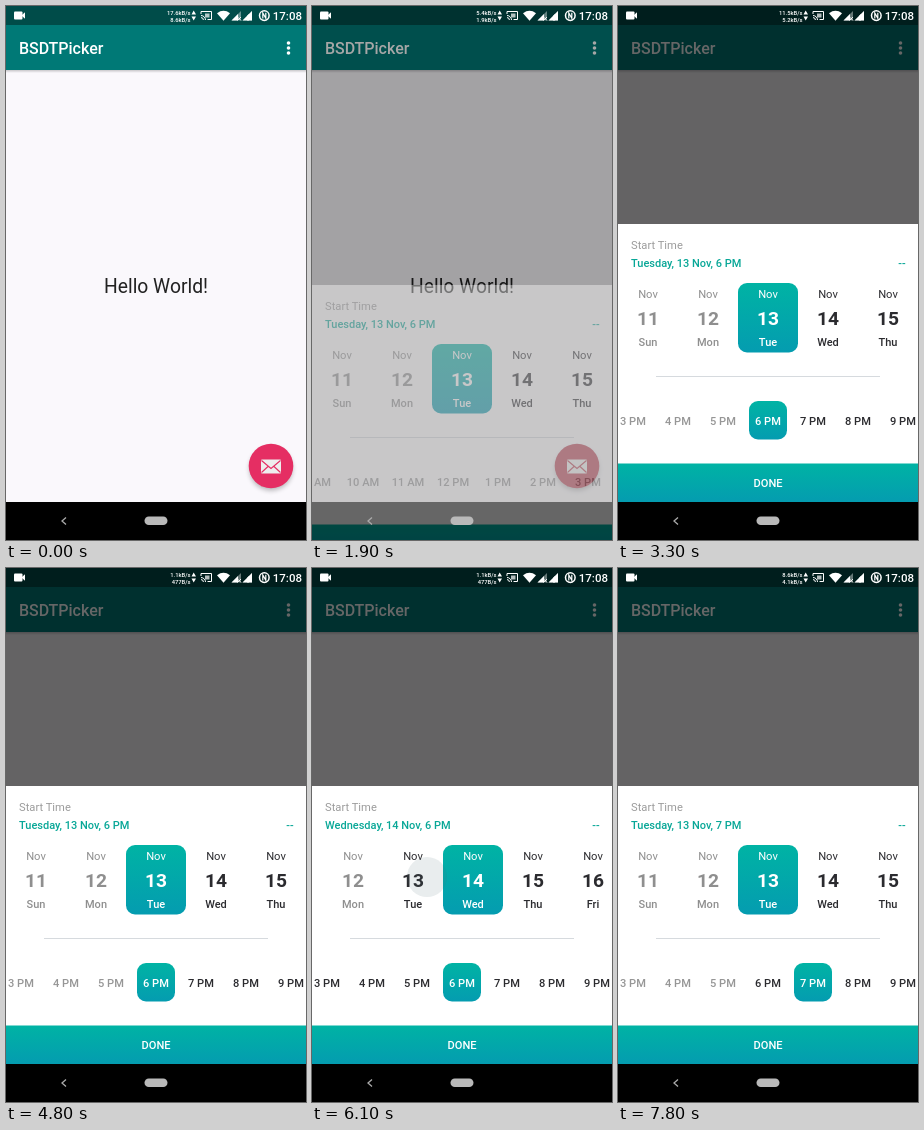
Animation of 300 by 534 pixels, one loop 8000 ms. Source, as an HTML page:

```html
<!DOCTYPE html>
<html lang="en">
<head>
<meta charset="utf-8">
<title>Date and time picker</title>
<style>
  html, body { margin: 0; width: 100%; height: 100%; overflow: hidden; background: #000; }
  svg { display: block; width: 100vw; height: 100vh; font-family: Roboto, "Noto Sans", sans-serif; }
</style>
</head>
<body>
<svg viewBox="0 0 300 534">
  <defs>
    <linearGradient id="teal" x1="0" y1="0" x2="0" y2="1">
      <stop offset="0" stop-color="#00b3a4"/>
      <stop offset="1" stop-color="#049cb0"/>
    </linearGradient>
    <linearGradient id="barShadow" x1="0" y1="0" x2="0" y2="1">
      <stop offset="0" stop-color="#000" stop-opacity=".2"/>
      <stop offset="1" stop-color="#000" stop-opacity="0"/>
    </linearGradient>
    <filter id="blur" x="-30%" y="-30%" width="160%" height="160%">
      <feGaussianBlur stdDeviation="2.5"/>
    </filter>
  </defs>
  <g id="scene"></g>
</svg>
<script>
const LOOP = 8000, STEP = 100;
const scene = document.getElementById('scene');
const WEEKDAYS = ['Sun', 'Mon', 'Tue', 'Wed', 'Thu', 'Fri', 'Sat'];
const LONG_DAYS = { 13: 'Tuesday', 14: 'Wednesday' };
const TODAY = 13, NOW_HOUR = 18;

// Each track holds its value until the next [time, value] entry.
const tracks = {
  net: [[0, ['17.6kB/s', '8.6kB/s']], [200, ['5.4kB/s', '1.9kB/s']], [3200, ['11.5kB/s', '5.2kB/s']],
        [4700, ['1.1kB/s', '477B/s']], [7800, ['8.6kB/s', '4.1kB/s']]],
  fab: [[0, '#e52e63'], [1500, '#dc2f5e'], [1600, '#cd3156'], [1700, '#c0324e'], [1800, '#b73347']],
  alpha: [[0, 0], [1900, .4], [2000, .85], [2100, 1]],
  dim: [[0, 0], [1900, .35], [2000, .53], [2100, .6]],
  drop: [[0, 61], [2000, 14], [2100, 0]],
  hourShift: [[0, 261], [2000, 130], [2100, 30], [2200, 0]],
  dayScroll: [[0, 0], [5100, .5], [5200, 1], [6100, 1 - 11 / 60], [6200, .45], [6300, .12], [6400, 0]],
  day: [[0, 13], [5200, 14], [6300, 13]],
  labelDay: [[0, 13], [5300, 14], [6400, 13]],
  hour: [[0, 18], [7200, 19]],
  touch: [[0, null], [1500, [265, 460]], [1600, null], [5000, [210, 312]], [5100, null],
          [6100, [115, 309]], [6200, [137, 309]], [6300, [157, 309]], [6400, null],
          [7100, [195, 414]], [7200, null]]
};

const sample = (track, t) => track.filter(([time]) => time <= t).pop()[1];

const text = (x, y, str, size, fill, weight = 400, anchor = 'start') =>
  `<text x="${x}" y="${y}" font-size="${size}" font-weight="${weight}" fill="${fill}" text-anchor="${anchor}">${str}</text>`;
const rect = (x, y, w, h, fill, rx = 0, extra = '') =>
  `<rect x="${x}" y="${y}" width="${w}" height="${h}" rx="${rx}" fill="${fill}" ${extra}/>`;
const circle = (x, y, r, fill, extra = '') =>
  `<circle cx="${x}" cy="${y}" r="${r}" fill="${fill}" ${extra}/>`;
const path = (d, fill = '#fff', extra = '') => `<path d="${d}" fill="${fill}" ${extra}/>`;
const stroke = (d, color, width) => path(d, 'none', `stroke="${color}" stroke-width="${width}"`);

const hourName = h => `${(h + 11) % 12 + 1} ${h < 12 ? 'AM' : 'PM'}`;

function app(s) {
  return rect(0, 0, 300, 534, '#faf8fc') +
    rect(0, 64, 300, 3, 'url(#barShadow)') +
    rect(0, 0, 300, 19, '#004c49') +
    rect(0, 19, 300, 45, '#007976') +
    text(13, 48, 'BSDTPicker', 16, '#fff', 500) +
    [37, 42, 47].map(y => circle(282.5, y, 1.8, '#fff')).join('') +
    text(150, 287, 'Hello World!', 19.3, '#222', 400, 'middle') +
    circle(265, 463, 21.5, '#000', 'opacity=".28" filter="url(#blur)"') +
    circle(265, 460, 22.3, s.fab) +
    rect(255, 453.5, 20, 14, '#eee', 1) +
    stroke('M255.5 454.5L265 462.5L274.5 454.5M255.5 466.5L262 460.5M274.5 466.5L268 460.5', s.fab, 1.1);
}

function days(s) {
  let out = '';
  for (let d = 10; d <= 17; d++) {
    const x = 150 + (d - TODAY - s.dayScroll) * 60;
    const on = d === s.day, past = d < TODAY;
    const color = on ? '#fff' : past ? '#8f8f8f' : '#2b2b2f';
    if (on) out += rect(x - 30, 277, 60, 69.5, 'url(#teal)', 9);
    out += text(x, 292, 'Nov', 11.2, color, 400, 'middle') +
      text(x, 319, d, 19.2, color, 700, 'middle') +
      text(x, 339.5, WEEKDAYS[(d - 11) % 7] || 'Sat', 11, color, 500, 'middle');
  }
  return out;
}

function hours(s) {
  let out = '';
  for (let h = 8; h <= 23; h++) {
    const x = 150 + (h - NOW_HOUR) * 45 + s.hourShift;
    const on = h === s.hour, past = s.labelDay === TODAY && h < NOW_HOUR;
    if (on) out += rect(x - 19, 395, 38, 38.5, 'url(#teal)', 9);
    out += text(x, 418.5, hourName(h), 11.1, on ? '#fff' : past ? '#969696' : '#2b2b2f', 500, 'middle');
  }
  return out;
}

function sheet(s) {
  const label = `${LONG_DAYS[s.labelDay]}, ${s.labelDay} Nov, ${hourName(s.hour)}`;
  return `<g opacity="${s.alpha}" transform="translate(0 ${s.drop})">` +
    rect(0, 218, 300, 278, '#fff') +
    text(13, 242.5, 'Start Time', 11.2, '#9c9c9c') +
    text(13, 261, label, 11, '#08a797', 500) +
    text(287.5, 261, '--', 11, '#08a797', 500, 'end') +
    days(s) + rect(38, 370, 224, 1, '#d6dade') + hours(s) +
    rect(0, 457.5, 300, 38.5, 'url(#teal)') +
    text(150, 481, 'DONE', 11.1, '#fff', 500, 'middle') + '</g>';
}

function statusIcons(s) {
  return rect(8, 5.5, 8.5, 8, '#fff', 1) + path('M16 9L19 6.2V12.8L16 10Z') +
    text(184.5, 8.7, s.net[0], 5.8, '#fff', 500, 'end') +
    text(184.5, 16, s.net[1], 5.8, '#fff', 500, 'end') +
    path('M185.5 8.5L187.7 4.5L190 8.5ZM185.5 10.5L187.7 14.5L190 10.5Z') +
    stroke('M195 8V5.5H205.5V13.5H201.5M195 9.5A4.5 4.5 0 0 1 199.5 14M195 11.6A2.4 2.4 0 0 1 197.4 14', '#fff', 1) +
    rect(199, 7.5, 4.5, 4, '#fff', 0, 'opacity=".7"') +
    path('M211 7.3Q217.5 2.4 224 7.3L217.5 14.8Z') +
    [225.5, 236.5].map(x =>
      path(`M${x} 14.5L${x + 9.5} 5V14.5Z`, '#fff', 'opacity=".4"') +
      path(`M${x} 14.5L${x + 6.5} 8V14.5Z`)).join('') +
    stroke('M231.5 11L235 14.5M235 11L231.5 14.5', '#fff', .9) +
    path('M241 10L246 5V14.5H241Z') +
    circle(258.3, 9.6, 4.8, 'none', 'stroke="#fff" stroke-width="1.5"') +
    stroke('M256.8 12.5V7L259.8 12.2V6.7', '#fff', 1.2) +
    text(296, 14, '17:08', 11.5, '#fff', 500, 'end');
}

function draw(t) {
  const s = {};
  for (const key in tracks) s[key] = sample(tracks[key], t);
  scene.innerHTML = app(s) +
    rect(0, 0, 300, 534, '#000', 0, `opacity="${s.dim}"`) +
    rect(0, 496, 300, 38, '#000') +
    (s.alpha ? sheet(s) : '') +
    (s.touch ? circle(...s.touch, 20, '#4d6a70', 'opacity=".12"') : '') +
    statusIcons(s) +
    stroke('M60 511.5L56 515L60 518.5', '#aaa', 1.3) +
    rect(138.5, 510.5, 23, 8.5, '#b9b9b9', 4.25);
}

let last = -1;
function frame(now) {
  const t = Math.floor(now % LOOP / STEP) * STEP;
  if (t !== last) draw(last = t);
  requestAnimationFrame(frame);
}
draw(0);
requestAnimationFrame(frame);
</script>
</body>
</html>
```
